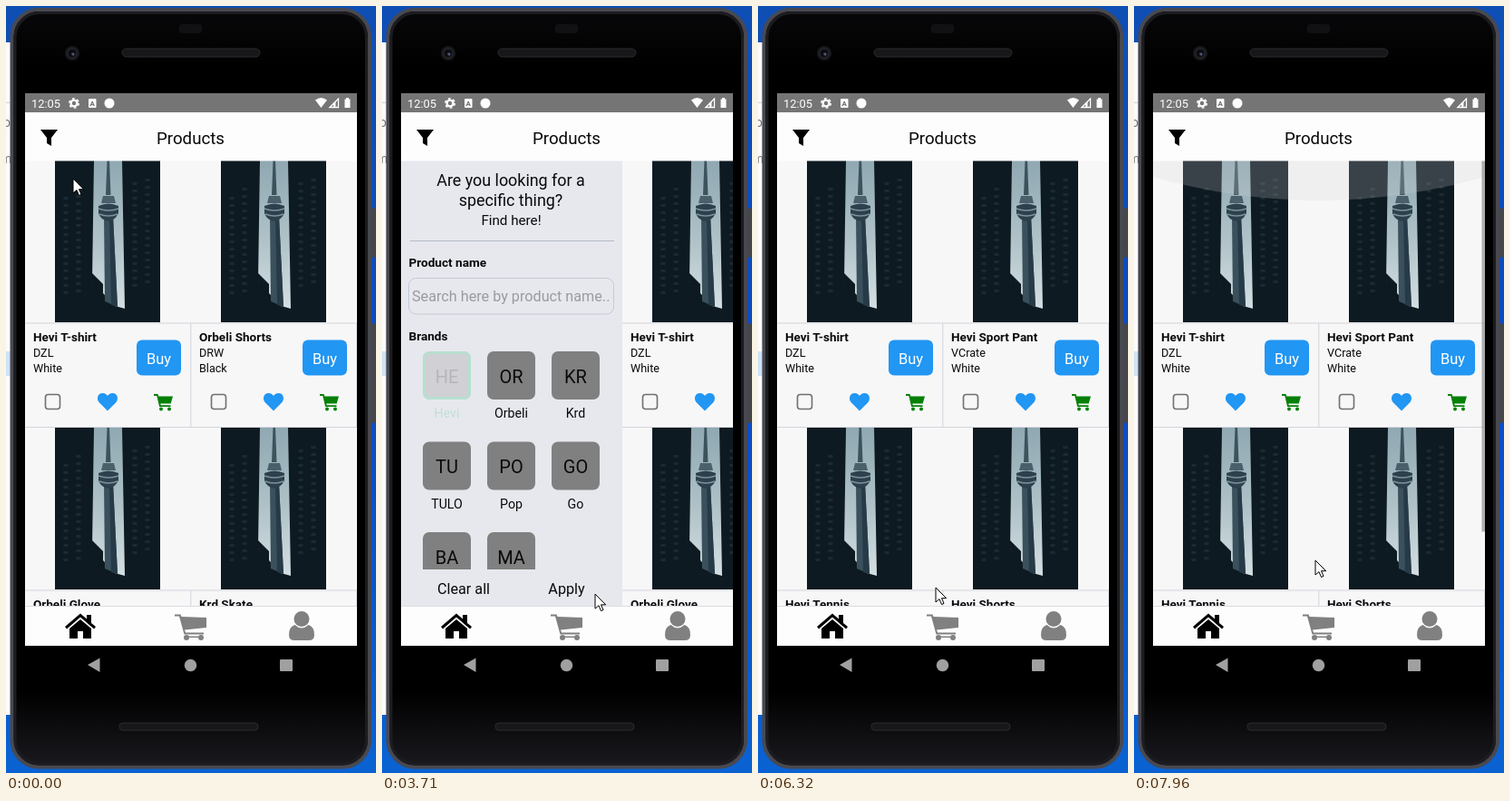
Animation, 408 px wide and 844 px high, one loop 8 s. Source, as an HTML page:

```html
<!DOCTYPE html>
<html lang="en">
<head>
<meta charset="utf-8">
<title>Products</title>
<style>
html, body { margin: 0; width: 100%; height: 100%; overflow: hidden; background: #0c4fc0; }
svg { display: block; width: 100%; height: 100%; }
text { font-family: Roboto, sans-serif; fill: #0a0a0c; }
.b { font-weight: 700; }
.m { text-anchor: middle; }
</style>
</head>
<body>
<svg id="stage" viewBox="0 0 408 844"></svg>
<script>
const LOOP = 8000, DRAWER = 244, MAX_SCROLL = 98;
const BLUE = '#2196f3', GRAY = '#808080', PAPER = '#fdfdfe';

const rect = (x, y, w, h, fill, extra = '') =>
  `<rect x="${x}" y="${y}" width="${w}" height="${h}" fill="${fill}" ${extra}/>`;
const text = (x, y, size, str, extra = '') =>
  `<text x="${x}" y="${y}" font-size="${size}" ${extra}>${str}</text>`;
const path = (d, fill, extra = '') => `<path d="${d}" fill="${fill}" ${extra}/>`;
const circle = (x, y, r, fill, extra = '') =>
  `<circle cx="${x}" cy="${y}" r="${r}" fill="${fill}" ${extra}/>`;
const at = (x, y, body, extra = '') =>
  `<g transform="translate(${x} ${y})" ${extra}>${body}</g>`;

const defs = `<defs>
  <linearGradient id="desk" x2="0" y2="1"><stop stop-color="#0f4fb4"/><stop offset=".5" stop-color="#0d4ac4"/><stop offset="1" stop-color="#0a62d2"/></linearGradient>
  <linearGradient id="body" x2="0" y2="1"><stop stop-color="#08080a"/><stop offset=".08" stop-color="#000"/><stop offset=".9" stop-color="#000"/><stop offset="1" stop-color="#1a1a1f"/></linearGradient>
  <linearGradient id="sky" x2="0" y2="1"><stop stop-color="#8fa8b2"/><stop offset=".5" stop-color="#adc0c6"/><stop offset="1" stop-color="#d3dfe2"/></linearGradient>
  <clipPath id="view">${rect(21, 170, 366, 490, '#000')}</clipPath>
  <clipPath id="brandsView">${rect(21, 370, 244, 250, '#000')}</clipPath>
  <g id="photo">
    ${rect(0, 0, 116, 178, '#0e1a21')}
    ${path('M12 40V150M26 30V150M88 24V140M102 20V140', 'none', 'stroke="#1b2a32" stroke-width="5" stroke-dasharray="3 5"')}
    ${path('M43 0H74L77 163L66 160L41 133Z', 'url(#sky)')}
    ${path('M41 124L53 136V156L41 133Z', '#0e1a21')}
    ${path('M57.5 0h2.5l1.500 38h-5.500z', '#3c525d')}
    ${path('M54 60H64L69 161L55 155Z', '#3a515d')}
    ${path('M60 62H64L69 161L62 159Z', '#263b47')}
    ${path('M53 39h12l2 8h-16z', '#4a606b')}
    ${path('M48 50Q59 45 70 50V58Q66 66 59 67Q51 66 48 58Z', '#2c414d')}
    ${path('M48 53Q59 57 70 53M49 59Q59 63 69 59', 'none', 'stroke="#7d939c" stroke-width="1.5"')}
  </g>
  <g id="cart">
    ${path('M0 0H4.500L5.300 2.500H21L18.700 10.500H7.300L7.700 12.200H18.500V14H6.200L3.300 2H0Z', 'currentColor')}
    ${circle(8, 16.4, 2, 'currentColor')}${circle(17, 16.4, 2, 'currentColor')}
  </g>
</defs>`;

function card([name, shop, colour], i) {
  const line = '#d3d4dc';
  return at(21 + 183 * (i % 2), 170 + 294 * (i >> 1), `
    <use href="#photo" x="33"/>
    ${rect(0, 178.5, 183, 1, line)}${rect(0, 293, 183, 1, line)}
    ${rect(182.3, 179, 1, 114, line)}
    ${text(9, 199, 13.5, name, 'class="b"')}
    ${text(9, 216, 12.6, shop)}${text(9, 233, 12.6, colour)}
    ${rect(123, 197.500, 49, 39, BLUE, 'rx="6"')}
    ${text(147.500, 223.500, 16.4, 'Buy', 'class="m" style="fill:#fff"')}
    ${rect(22.500, 257.500, 16, 16, 'none', 'rx="3" stroke="#707070" stroke-width="1.6"')}
    ${path('M91 275.500L81.500 266C78 261 81 256 85.500 256Q89 256 91 259Q93 256 96.500 256C101 256 104 261 100.500 266Z', BLUE)}
    <use href="#cart" x="142" y="257" color="#068006"/>`);
}

const allItems = [
  ['Hevi T-shirt', 'DZL', 'White'], ['Orbeli Shorts', 'DRW', 'Black'],
  ['Orbeli Glove', 'DZL', 'White'], ['Krd Skate', 'DRW', 'Black']];
const filteredItems = [
  ['Hevi T-shirt', 'DZL', 'White'], ['Hevi Sport Pant', 'VCrate', 'White'],
  ['Hevi Tennis', 'DZL', 'White'], ['Hevi Shorts', 'NookY', 'White']];
const brands = ['Hevi', 'Orbeli', 'Krd', 'TULO', 'Pop', 'Go', 'Ba', 'Ma'];

function brand(name, i) {
  const first = i === 0;
  return at(45 + 71 * (i % 3), 380 + 99.500 * Math.floor(i / 3), `
    ${rect(0, 0, 53, 53, GRAY, 'rx="7"')}
    ${first ? rect(1.5, 1.5, 50, 50, 'none', 'id="ring" rx="6" stroke="#12c25c" stroke-width="3"') : ''}
    ${text(26.500, 34.500, 20, name.slice(0, 2).toUpperCase(), 'class="m"')}
    ${text(26.500, 73, 14.2, name, 'class="m"' + (first ? ' id="label"' : ''))}`,
    first ? 'id="pick"' : '');
}

const desktop = `
  ${rect(0, 0, 408, 844, 'url(#desk)')}
  ${rect(0, 40, 12, 740, '#fcfcfd')}
  ${rect(0, 106, 8, 1, '#d0d0d6')}${rect(0, 380, 8, 27, '#cfe4f6')}
  ${text(-3, 133, 14, 'o', 'style="fill:#777"')}${text(-6, 173, 14, 'm', 'style="fill:#777"')}`;

const phone = `
  ${rect(400, 222, 7, 55, '#45464c', 'rx="2"')}${rect(400, 349, 7, 110, '#45464c', 'rx="2"')}
  ${rect(6.5, 4, 394.500, 833.500, 'url(#body)', 'rx="30" stroke="#484950" stroke-width="4"')}
  ${rect(10, 7.5, 387.500, 826.500, 'none', 'rx="27" stroke="#1c1c21" stroke-width="3"')}
  ${rect(191, 20, 25, 10, '#111114', 'rx="3"')}
  ${rect(128, 47, 152, 9, '#17171a', 'rx="4.5" stroke="#2b2b30"')}
  ${circle(73, 52, 8, '#18191d')}${circle(73, 52, 5, '#0a0b10', 'stroke="#2f3036"')}${circle(74, 53, 1.8, '#4a5468')}
  ${rect(125, 789, 153, 8, '#17171a', 'rx="4" stroke="#2b2b30"')}`;

const gear = circle(75, 107, 3.4, 'none', 'stroke="#fff" stroke-width="2.4"') +
  circle(75, 107, 5.2, 'none', 'stroke="#fff" stroke-width="1.6" stroke-dasharray="2.7 2.745"');
const statusBar = `
  ${rect(21, 96, 366, 21, '#757575')}
  ${text(28, 111.500, 12.9, '12:05', 'style="fill:#fff"')}${gear}
  ${rect(91, 102, 8.500, 10, '#fff', 'rx="1"')}
  ${text(95.200, 110, 8, 'A', 'class="m b" style="fill:#666"')}
  ${circle(114, 107, 5.5, '#fff')}
  ${path('M341 103.500Q347.500 98.500 354 103.500L347.500 112Z', '#fff')}
  ${path('M357 111.500L366.500 102V111.500Z', 'none', 'stroke="#fff" stroke-width="1.3"')}
  ${path('M361 111.500V107.500L363.500 105V111.500Z', '#fff')}
  ${path('M373.500 102.500h1.500v-1.500h3v1.500h1.500v9.500h-6z', '#fff')}`;

const header = `
  ${rect(21, 117, 366, 53.500, PAPER)}
  ${path('M38 136H57L50 145V154L45 151V145Z', '#000', 'id="funnel"')}
  ${text(203.500, 151.500, 18.7, 'Products', 'class="m"')}`;

const tabs = `
  ${rect(21, 660, 366, 44, PAPER)}${rect(21, 660, 366, 1, '#dcdce2')}
  ${path('M65 683L82 668.500L89 674.500V670H94V679L99 683L97 685.500L82 672.500L67 685.500Z', '#000')}
  ${path('M70 685L82 675L94 685V696H85V688H79V696H70Z', '#000')}
  ${path('M186 669.500H192.500L193.500 672L221 673V684L197 686.500L198 689.500H218V691.500H196.500L191 671.500H186Z', GRAY)}
  ${circle(199, 695, 3, GRAY)}${circle(215, 695, 3, GRAY)}${rect(199, 693.500, 16, 1.500, GRAY)}
  ${circle(326, 674.500, 8.500, GRAY)}
  ${path('M318.500 681Q326 688 333.500 681Q340 683 340 692Q340 698 334 698H318Q312 698 312 692Q312 683 318.500 681Z', GRAY)}
  ${path('M90 725L103.500 717.500V733Z', '#a0a0a0')}
  ${circle(203.500, 725.500, 6.7, '#a0a0a0')}${rect(302, 719, 14, 13, '#a0a0a0', 'rx="1"')}`;

const drawer = `
  ${rect(21, 170, 366, 490, '#e7e8ee')}
  ${text(142, 198, 17.9, 'Are you looking for a', 'class="m"')}
  ${text(142, 219.500, 17.9, 'specific thing?', 'class="m"')}
  ${text(142.500, 241, 15.2, 'Find here!', 'class="m"')}
  ${rect(31, 258, 225, 1, '#b4bac6')}
  ${text(29.500, 287, 13.6, 'Product name', 'class="b"')}
  ${rect(29.500, 299.500, 226, 39.500, 'none', 'rx="8" stroke="#c3cad6"')}
  ${text(33, 325, 16.2, 'Search here by product name..', 'style="fill:#9a9a9e"')}
  ${text(29.500, 367.500, 13.6, 'Brands', 'class="b"')}
  <g clip-path="url(#brandsView)">${brands.map(brand).join('')}</g>
  ${text(90, 647, 16.2, 'Clear all', 'class="m"')}
  ${text(203.500, 647, 16.2, 'Apply', 'class="m" id="apply"')}`;

const list = `<g id="list">
  ${rect(21, 170, 366, 490, '#f7f7f8')}
  <g id="scroller">
    <g id="all">${allItems.map(card).join('')}</g>
    <g id="filtered">${filteredItems.map(card).join('')}</g>
  </g>
  ${path('M21 170V188Q204 240 387 188V170Z', '#d0d0d0', 'id="glow"')}
  ${rect(383.500, 170, 3.500, 408.500, '#888', 'id="bar"')}
</g>`;

const cursor = path('M0 0V16L4 12.600L6.500 18.500L9 17.400L6.500 11.700H11.700Z', '#fff',
  'id="cursor" stroke="#000" stroke-width="1" stroke-linejoin="round"');

const stage = document.getElementById('stage');
stage.innerHTML = defs + desktop + phone + statusBar +
  `<g clip-path="url(#view)">${drawer}${list}</g>` + header + tabs + cursor;
const el = id => document.getElementById(id);
const set = (id, name, value) => el(id).setAttribute(name, value);
const move = (id, x, y) => set(id, 'transform', `translate(${x.toFixed(2)} ${y.toFixed(2)})`);

const smooth = u => u * u * (3 - 2 * u);

// Keys are [time, value...]; returns the eased values at t.
function tween(keys, t) {
  if (t <= keys[0][0]) return keys[0].slice(1);
  for (let i = 1; i < keys.length; i++) {
    const a = keys[i - 1], b = keys[i];
    if (t < b[0]) {
      const u = smooth((t - a[0]) / (b[0] - a[0]));
      return a.slice(1).map((v, k) => v + (b[k + 1] - v) * u);
    }
  }
  return keys[keys.length - 1].slice(1);
}

const pointer = [[130, 74, 190], [950, 200, 618], [1500, 48, 142], [1760, 48, 142],
  [2100, 321, 449], [2650, 321, 449], [3150, 72, 405], [3400, 72, 405], [3700, 235, 647],
  [3950, 240, 672], [4300, 234, 640], [5100, 206, 637], [5450, 196, 640], [6880, 196, 640],
  [7220, 201, 429], [7480, 201, 429], [7930, 200, 610]];
const slide = [[1800, 0], [2100, DRAWER + 1], [2400, DRAWER], [5747, DRAWER], [6047, 0]];
const scroll = [[6910, 0], [7130, MAX_SCROLL], [7510, MAX_SCROLL], [7790, 0]];
const funnelFade = [[1640, 1], [1740, .2], [1800, .2], [2050, 1]];
const pickFade = [[3540, 1], [3640, .22], [3730, .22], [3980, 1]];
const applyFade = [[5540, 1], [5640, .2], [5860, .2], [6100, 1]];
const barFade = [[6900, 0], [6960, .65]];
const glowFade = [[7770, 0], [7930, .22]];

function draw(t) {
  const [x, y] = tween(pointer, t);
  move('cursor', x, y);
  move('list', tween(slide, t)[0], 0);

  const s = tween(scroll, t)[0];
  move('scroller', 0, -s);
  move('bar', 0, s * 490 / 588);

  const fades = { funnel: funnelFade, pick: pickFade, apply: applyFade, bar: barFade, glow: glowFade };
  for (const id in fades) set(id, 'opacity', tween(fades[id], t)[0]);

  const filtered = t >= 5690, picked = t >= 3600;
  set('all', 'display', filtered ? 'none' : 'inline');
  set('filtered', 'display', filtered ? 'inline' : 'none');
  set('ring', 'display', picked ? 'inline' : 'none');
  el('label').style.fill = picked ? '#35c46e' : '';
}

const start = performance.now();
function tick() {
  draw((performance.now() - start) % LOOP);
  requestAnimationFrame(tick);
}
tick();
</script>
</body>
</html>
```
